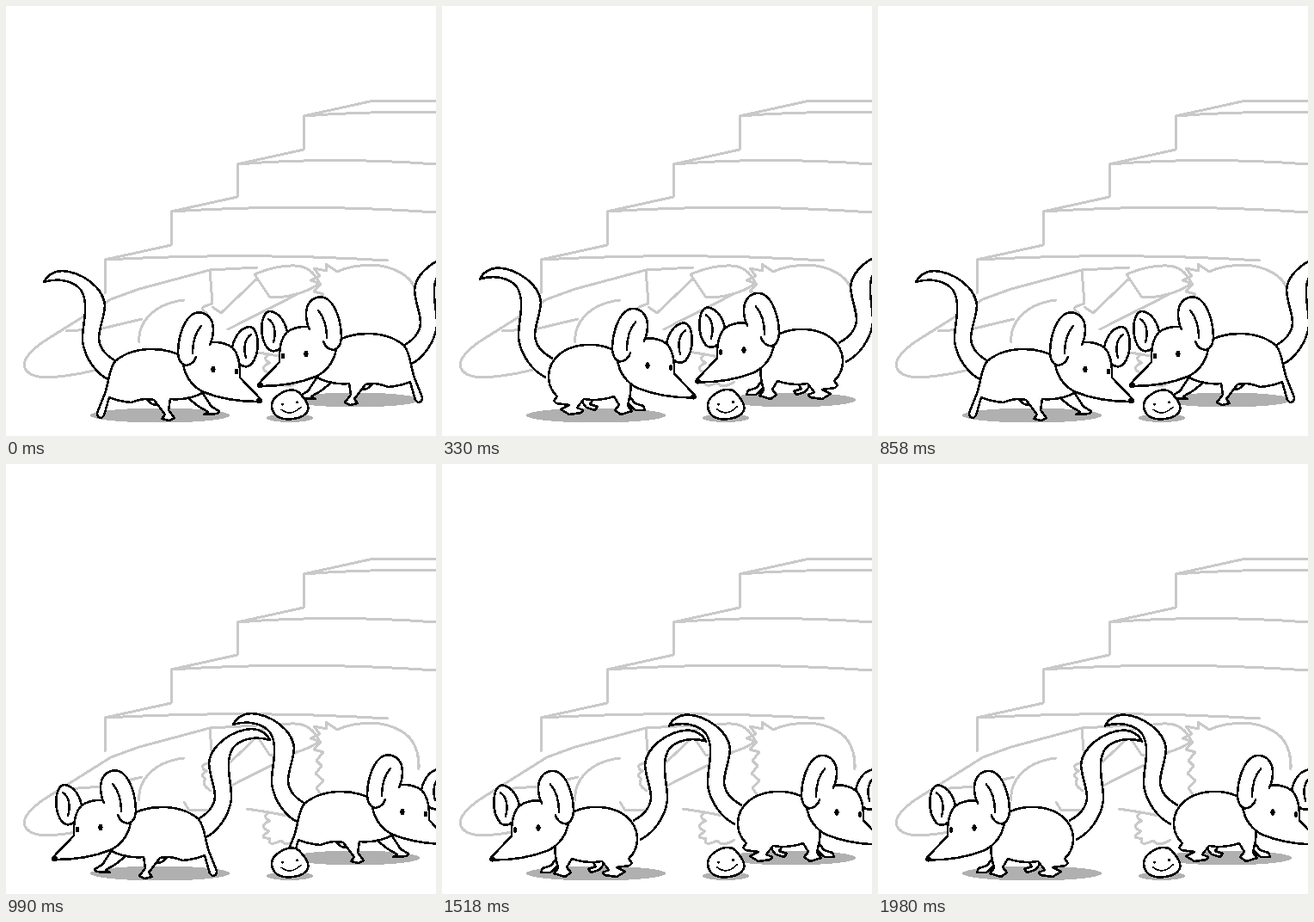
Recreate the animation shown at these times as an HTML page. Size 500x500 px, loop 2310 ms.

```html
<!DOCTYPE html>
<html lang="en">
<head>
<meta charset="utf-8">
<title>Two mice</title>
<style>
  html, body { margin: 0; width: 100%; height: 100%; overflow: hidden; background: #fff; }
  svg { display: block; width: 500px; height: 500px; }
  path, ellipse { stroke-linejoin: round; stroke-linecap: round; }
  .back { fill: none; stroke: #c9c9c9; stroke-width: 3; }
  .ground { fill: #b0b0b0; }
  .ink { fill: #fff; stroke: #000; stroke-width: 2.6; }
  .line { fill: none; stroke: #000; stroke-width: 2.4; }
  .thin { fill: none; stroke: #000; stroke-width: 1.5; }
  .dot { fill: #000; }
</style>
</head>
<body>
<svg viewBox="0 0 500 500" shape-rendering="crispEdges">
  <defs>
    <g id="tail">
      <path class="ink" d="M128 413C117 407 109 399 108 387C108 374 114 364 115 348C113 327 88 309 65 308Q50 309 44 321C60 316 78 319 87 330C98 348 88 370 89 390C92 411 106 428 120 435"/>
    </g>
    <g id="head">
      <path class="ink" d="M263 397C266 382 275 373 284 373C295 376 296 404 285 417Q279 422 271 416"/>
      <path class="line" d="M285 382C277 387 276 399 279 409"/>
      <path class="ink" d="M206 416C208 431 217 443 230 449C250 457 270 460 293 460L296 457L272 432Q273 407 263 397Q253 390 239 391L216 404Z"/>
      <path class="ink" d="M221 408Q218 417 209 418Q201 416 200 404C200 385 207 362 220 357C234 354 241 365 241 376Q241 386 237 394"/>
      <path class="line" d="M227 372C219 381 217 393 217 404"/>
      <ellipse class="dot" cx="241" cy="422.5" rx="2.6" ry="4"/>
      <ellipse class="dot" cx="268" cy="425" rx="2.2" ry="3.4"/>
      <ellipse class="dot" cx="294.5" cy="459" rx="3.5" ry="3"/>
    </g>
    <g id="stride">
      <use href="#tail"/>
      <path class="ink" d="M212 456L223 465L235 472L230 475L246 474L248 471L239 466L228 449"/>
      <path class="ink" d="M163 457L170 463L177 464L179 456"/>
      <path class="ink" d="M206 409C192 397 150 393 127 413C119 423 120 439 114 453L106 473Q106 479 111 479L114 476L120 455Q132 460 146 461Q160 455 172 458L185 475L181 480L190 482L196 479L189 470L191 457Q212 459 230 449L222 410"/>
      <use href="#head"/>
    </g>
    <g id="squat">
      <use href="#tail" transform="translate(0 -3.5)"/>
      <path class="ink" d="M220 456L224 462L234 465L236 470L225 470L216 462"/>
      <path class="ink" d="M161 458L168 467L178 470L181 466L172 463L178 455"/>
      <path class="ink" d="M203 403C188 390 147 389 130 412C121 425 122 443 134 454L130 459L133 462L148 464L138 469L148 475L162 473L164 470L157 467L165 457Q182 460 200 454L206 464L201 470L208 475L221 471L216 465L219 451L222 407"/>
      <use href="#head" transform="translate(-2 -4.5)"/>
    </g>
  </defs>

  <g class="back">
    <path d="M500 110L423 111L346 128V167L269 184V222L192 239V278L115 295V334"/>
    <path d="M346 128Q420 122 500 124M269 184Q380 175 500 184M192 239Q345 229 500 240M115 295Q285 286 444 296"/>
    <path d="M292 304L237 307L155 329L122 341L44 390Q21 406 21 418Q24 432 50 432Q90 429 122 418"/>
    <path d="M70 378L112 375L158 364M207 342C172 346 153 368 155 391M207 393L213 403L240 402"/>
    <path d="M237 307L240 346L229 350Q228 356 234 357Q224 361 232 366Q226 372 238 380M240 350L250 357L292 317"/>
    <path d="M364 321Q354 302 336 302Q315 301 289 312L307 339Q340 339 364 323M258 376L343 333"/>
    <path d="M385 309Q402 301 428 301Q456 304 470 319Q481 333 480 355"/>
    <path d="M385 309L372 300L373 308L358 305L365 314L354 319L366 323L358 332L369 335L361 345L367 351L360 360L369 368L361 377L370 390"/>
    <path d="M280 401L306 405Q297 410 307 415Q292 421 306 427Q292 436 307 435Q303 446 320 438Q326 446 340 437M306 405Q325 409 346 412"/>
  </g>

  <g class="ground">
    <ellipse cx="179" cy="476" rx="81" ry="8.5"/>
    <ellipse cx="406" cy="458" rx="75" ry="8.5"/>
    <ellipse cx="330" cy="479" rx="27" ry="5"/>
  </g>

  <use id="right"/>
  <g id="ball">
    <path class="ink" d="M313 455C322 446 334 443 341 449C347 456 353 463 351 470C347 481 324 483 315 477C308 471 307 461 313 455Z"/>
    <path class="thin" d="M320 469Q331 478 343 466"/>
    <ellipse class="dot" cx="321.5" cy="463" rx="1.4" ry="1.5"/>
    <ellipse class="dot" cx="338.5" cy="460.5" rx="1.4" ry="1.5"/>
  </g>
  <use id="left"/>
</svg>
<script>
  const STEP = 330;
  // Each step: pose, whether the mice face each other, vertical nudge.
  const meet = { stride: ["stride", true, 0], squat: ["squat", true, 0] };
  const part = { stride: ["stride", false, 0], squat: ["squat", false, 5] };
  const steps = [
    meet.stride, meet.squat, meet.stride,
    part.stride, part.squat, part.stride, part.squat
  ];

  const [left, right, ball] = ["left", "right", "ball"].map(id => document.getElementById(id));
  let shown = -1;

  function place(mouse, pose, x, y, flip) {
    mouse.setAttribute("href", "#" + pose);
    mouse.setAttribute("transform", `translate(${x} ${y}) scale(${flip ? -1 : 1} 1)`);
  }

  function draw(index) {
    const [pose, facing, dy] = steps[index];
    place(left, pose, facing ? 0 : 351, dy, !facing);
    place(right, pose, facing ? 590 : 220, dy - 18, facing);
    const squash = pose === "stride" ? 0.98 : 1;
    ball.setAttribute("transform", `translate(0 ${480 * (1 - squash)}) scale(1 ${squash})`);
  }

  function tick() {
    const index = Math.floor(performance.now() / STEP) % steps.length;
    if (index !== shown) draw(shown = index);
    requestAnimationFrame(tick);
  }
  tick();
</script>
</body>
</html>
```
